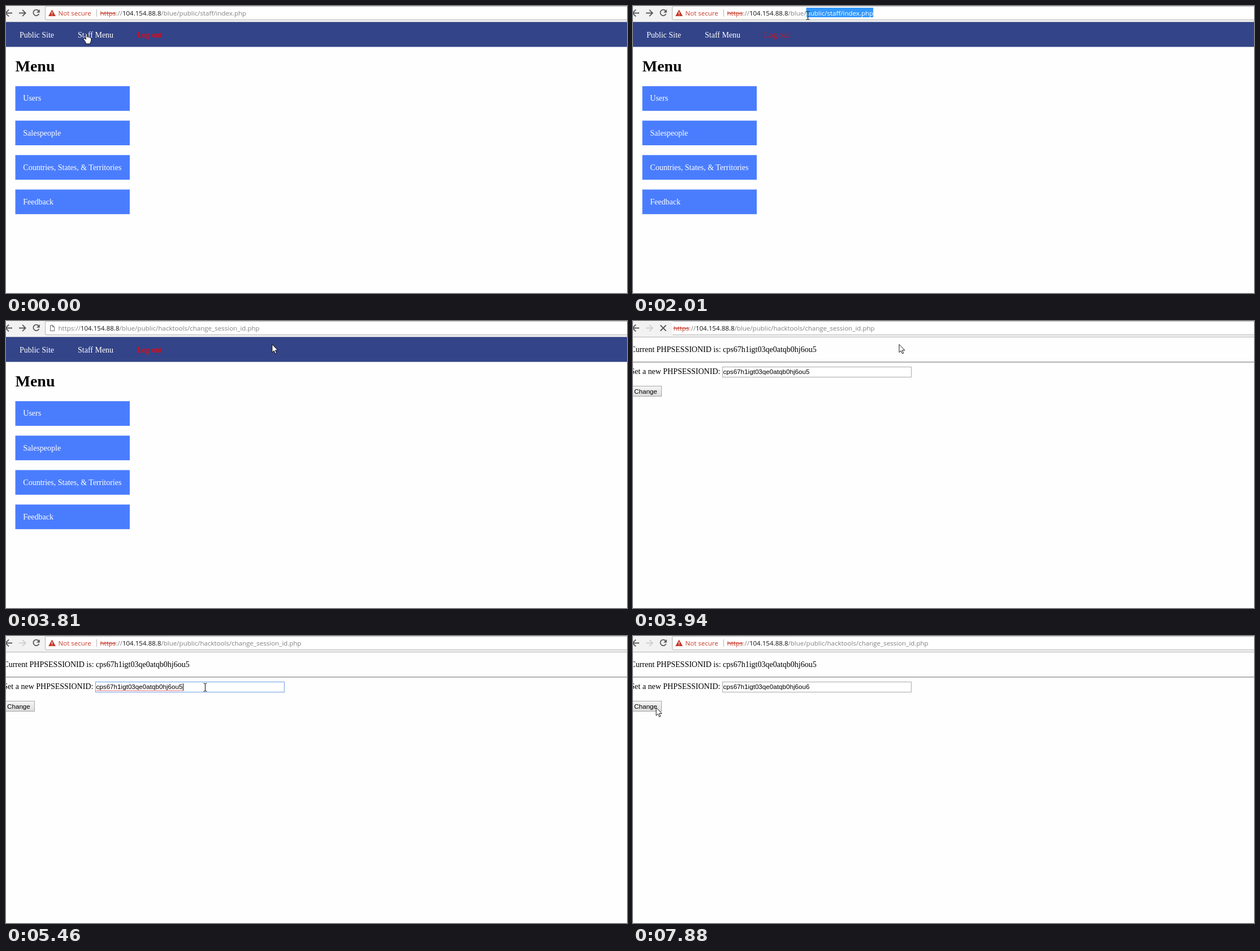
These frames come from a looping animation (1099x509 px, 8000 ms). An HTML page:

```html
<!DOCTYPE html>
<html lang="en">
<head>
<meta charset="utf-8">
<title>Session ID demo</title>
<style>
  html, body { margin: 0; width: 100%; height: 100%; overflow: hidden; background: #fefefe; }
  svg { display: block; width: 1099px; height: 509px; }
  text { white-space: pre; }
  .ui { font: 11.56px 'Open Sans', sans-serif; fill: #808080; }
  .serif { font: 14px 'Liberation Serif', serif; }
  .form { font: 11.67px 'Liberation Sans', sans-serif; }
  .white { fill: #fff; }
  .icon { fill: none; stroke: #5a5a5a; stroke-width: 1.8; }
  .cursor { fill: #fff; stroke: #000; stroke-width: .9; stroke-linejoin: round; }
</style>
</head>
<body>
<svg viewBox="0 0 1099 509">
  <defs>
    <linearGradient id="face" x2="0" y2="1">
      <stop stop-color="#f6f6f6"/><stop offset="1" stop-color="#dcdcdc"/>
    </linearGradient>
  </defs>
  <rect width="1099" height="509" fill="#fefefe"/>

  <!-- browser bar -->
  <rect width="1099" height="28" fill="#f2f2f2"/>
  <rect y="28" width="1099" height="1" fill="#b4b4b4"/>
  <rect x="69" width="1030" height="25" fill="#fff"/>
  <path d="M70 .5H1099M70 24.5H1099" stroke="#b3b3b3"/>
  <path id="barEdge" d="M69.5 1V24" stroke="#b3b3b3"/>
  <path class="icon" d="M11 12.5H0M5 6.5L-1 12.5L5 18.5"/>
  <path class="icon" id="forward" d="M23 12.5H34M29 6.8L34.7 12.5L29 18.2"/>
  <g id="reload">
    <path class="icon" d="M57.6 8.6A5.2 5.2 0 1 0 58.4 13.8"/>
    <path d="M59.8 6V11.8H54Z" fill="#5a5a5a"/>
  </g>
  <path class="icon" id="stop" d="M48.5 7.5L58.5 17.5M58.5 7.5L48.5 17.5"/>
  <g id="warning">
    <path d="M81.5 6.5L88 18H75Z" fill="#c53929"/>
    <path d="M81.5 10.5V14M81.5 15.2V16.6" stroke="#fff" stroke-width="1.3"/>
    <text class="ui" x="92.5" y="17" style="fill:#c53929">Not secure</text>
    <path d="M160.5 6V19" stroke="#b5b5b5"/>
  </g>
  <path id="pageIcon" d="M78.5 7.5H82.5L85.5 10.5V17.5H78.5ZM82.5 7.5V10.5H85.5" fill="none" stroke="#666"/>
  <rect id="mark" y="3" height="17" fill="#3399ff"/>
  <text class="ui" id="url" y="17"><tspan id="scheme">https</tspan>://<tspan fill="#111">104.154.88.8</tspan><tspan id="path"></tspan><tspan id="picked" fill="#fff"></tspan></text>

  <g id="menuPage">
    <rect y="28.5" width="1099" height="44" fill="#334488"/>
    <g class="serif white">
      <text x="24" y="56">Public Site</text>
      <text x="127" y="56">Staff Menu</text>
      <text x="232" y="56" fill="#f00">Log out</text>
    </g>
    <text class="serif" x="16.5" y="116" style="font-size:28px;font-weight:bold">Menu</text>
    <g id="items"></g>
  </g>

  <g id="formPage">
    <text class="serif" x="-4.7" y="55">Current PHPSESSIONID is: cps67h1igt03qe0atqb0hj6ou5</text>
    <rect y="72" width="1099" height="1.6" fill="#a0a0a0"/>
    <text class="serif" x="-4.7" y="94">Set a new PHPSESSIONID:</text>
    <rect id="field" x="158.5" y="81.5" width="334" height="18" fill="#fff"/>
    <text class="form" id="value" x="159.5" y="94"></text>
    <path id="squiggle" fill="none" stroke="#f33" stroke-width=".8"/>
    <rect id="caret" y="84" width="1" height="13"/>
    <rect x="-4.5" y="115.5" width="55" height="18" fill="url(#face)" stroke="#a6a6a6"/>
    <text class="form" x="2" y="128.6">Change</text>
  </g>

  <path class="cursor" id="arrow" d="M0 0V14.2L3.3 11.2L5.6 16.4L7.8 15.5L5.5 10.4H10Z"/>
  <path class="cursor" id="hand" d="M-1.3 1Q0-.6 1.3 1V6Q2.8 5 3.9 6.6Q5.2 5.8 6.3 7.2Q7.8 6.7 8.4 8.4V12Q8 14.5 6.6 16V18H-1.3V16L-5.3 9.7Q-5.2 7.7-3.2 8.4L-1.3 10.3Z"/>
  <path id="beam" d="M-3-7H-1L0-6L1-7H3M0-6V6M-3 7H-1L0 6L1 7H3" fill="none" stroke="#000"/>
</svg>
<script>
const LOOP = 8000, TICK = 130;
const $ = id => document.getElementById(id);
const set = (id, attrs) => { for (const k in attrs) $(id).setAttribute(k, attrs[k]); };
const show = (id, on) => { $(id).style.display = on ? '' : 'none'; };
const write = (id, s) => { if ($(id).textContent !== s) $(id).textContent = s; };

$('items').innerHTML = ['Users', 'Salespeople', 'Countries, States, &amp; Territories', 'Feedback']
  .map((label, i) => `<g transform="translate(0 ${142.2 + 61.1 * i})">
    <rect x="16.5" width="202.5" height="43.7" fill="#4a7dfe"/>
    <text class="serif white" x="30.3" y="26.3">${label}</text></g>`).join('');
$('squiggle').setAttribute('d', 'M160 97.5' + 'l1.5-1.5l1.5 1.5'.repeat(51));

const MENU_PATH = '/blue/public/staff/index.php';
const FORM_PATH = '/blue/public/hacktools/change_session_id.php';
const PICK = 1310, PICKED = 2010, PASTE = 3280, OPEN = 3940, SECURE = 4090, LOADED = 4220;
const FOCUS = 5330, ERASE = 5860, WAKE = 6520, TYPE = 7300, BLUR = 7880;

// Turning points of the pointer: when, where
const link = { x: 142.5, y: 49 }, barEnd = { x: 455.5, y: 14 }, pick = { x: 309.5, y: 17 };
const rest = { x: 326, y: 21 }, nav = { x: 471, y: 41.5 }, field = { x: 352.5, y: 91 };
const route = [
  [0, link], [30, link], [420, { x: 290, y: 66 }], [790, barEnd], [890, barEnd],
  [1190, { x: 423.5, y: 14 }], [1700, { x: 299.5, y: 16 }], [PICKED, pick], [2260, pick],
  [2660, rest], [PASTE - TICK, rest], [3810, nav], [SECURE, nav], [4640, { x: 468, y: 100 }],
  [FOCUS, field], [TYPE, field], [BLUR, { x: 41, y: 127 }], [LOOP, { x: 41, y: 127 }]
];

// The pointer is sampled about once per tick along each leg
function pointerAt(t) {
  const i = route.findLastIndex(([start]) => start <= t);
  const [t0, a] = route[i], [t1, b] = route[i + 1];
  const steps = Math.max(1, Math.round((t1 - t0) / TICK));
  const u = Math.floor((t - t0) / (t1 - t0) * steps) / steps;
  return { x: a.x + (b.x - a.x) * u, y: a.y + (b.y - a.y) * u };
}

function pointerShape(t, { x, y }) {
  const inside = (l, top, r, bottom) => x > l && x < r && y > top && y < bottom;
  if (t >= ERASE && t < WAKE) return 'none';
  if (inside(69, 0, 1099, 21)) return 'beam';
  if (t >= OPEN) return inside(158, 81, 493, 100) ? 'beam' : 'arrow';
  return inside(127, 44, 190, 60) || inside(232, 44, 277, 60) ? 'hand' : 'arrow';
}

function drawBar(t) {
  const loading = t >= OPEN && t < LOADED;
  const editing = t >= PASTE && t < OPEN;
  const warned = t < PASTE || t >= SECURE;
  show('warning', warned);
  show('pageIcon', editing);
  show('stop', loading);
  show('reload', !loading);
  show('barEdge', !loading);
  $('forward').style.stroke = t < OPEN ? '' : '#cfcfcf';
  $('scheme').style.cssText = editing ? '' : 'fill:#c53929;text-decoration:line-through';
  set('url', { x: warned ? 166.5 : editing ? 92.5 : 71.5 });

  // Selection grows from the end of the address to the pointer
  const path = t < PASTE ? MENU_PATH : FORM_PATH;
  const picking = t >= PICK && t < PASTE;
  const count = picking ? Math.round((426 - pointerAt(Math.min(t, PICKED)).x) / 5.4) : 0;
  write('path', path.slice(0, path.length - count));
  write('picked', path.slice(path.length - count));
  show('mark', count > 0);
  if (count) set('mark', {
    x: $('picked').getStartPositionOfChar(0).x,
    width: $('picked').getComputedTextLength()
  });
}

function drawForm(t) {
  const focused = t >= FOCUS && t < BLUR;
  const lastKey = t < ERASE ? FOCUS : t < TYPE ? ERASE : TYPE;
  write('value', 'cps67h1igt03qe0atqb0hj6ou' + (t < ERASE ? '5' : t < TYPE ? '' : '6'));
  set('field', { stroke: focused ? '#6a9fe6' : '#a9a9a9' });
  show('squiggle', focused && t < ERASE);
  show('caret', focused && (t - lastKey) % 1030 < 530);
  set('caret', { x: 160 + Math.round($('value').getComputedTextLength()) });
}

function draw() {
  const t = performance.now() % LOOP;
  const mouse = pointerAt(t), shape = pointerShape(t, mouse);
  show('menuPage', t < OPEN);
  show('formPage', t >= OPEN);
  drawBar(t);
  if (t >= OPEN) drawForm(t);
  for (const s of ['hand', 'arrow', 'beam']) {
    show(s, s === shape);
    set(s, { transform: `translate(${mouse.x} ${mouse.y})` });
  }
  requestAnimationFrame(draw);
}
draw();
</script>
</body>
</html>
```
